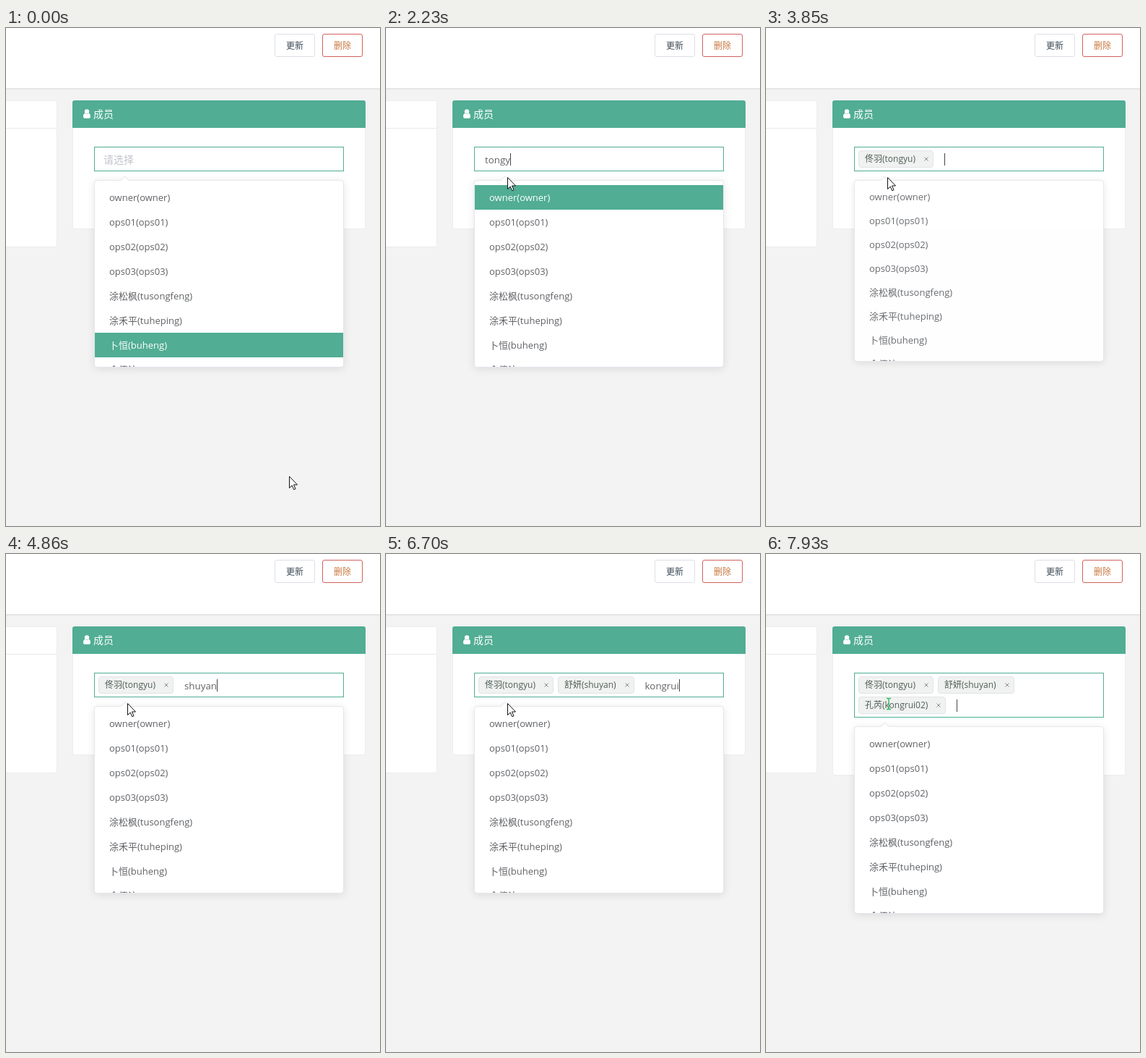
An HTML page that plays this animation: 518 px wide and 688 px high, repeating every 8 s.

```html
<!DOCTYPE html>
<html lang="zh-CN">
<head>
<meta charset="utf-8">
<style>
  html, body { margin: 0; width: 100%; height: 100%; overflow: hidden; }
  body { position: relative; background: #f3f3f3; color: #606266;
         font: 13px "Open Sans", "Noto Sans CJK SC", "Noto Sans CJK", sans-serif; }
  body > * { position: absolute; box-sizing: border-box; }
  .bar { left: 0; top: 0; width: 518px; height: 85px; background: #fff; border-bottom: 2px solid #e5e5e5; }
  .button { top: 8px; width: 56px; height: 32px; border: 1px solid #dcdfe6; border-radius: 3px;
            font-size: 12px; line-height: 31px; text-align: center; color: #3c4a56; }
  .danger { border-color: #d2615c; color: #c8783f; }
  .panel { top: 100px; background: #fff; border-radius: 3px; box-shadow: inset 0 0 0 1px #ebedf1; }
  .side { left: -20px; width: 91px; height: 203px; }
  .side::before { content: ""; position: absolute; top: 38px; width: 100%; height: 1px; background: #e6e8ec; }
  .main { left: 92px; width: 406px; padding: 0 30px 80px; }
  .title { margin: 0 -30px 26px; height: 38px; padding-left: 29px; background: #51ad94; color: #fff;
           border-radius: 3px 3px 0 0; font-size: 14px; line-height: 38px; }
  .title svg { position: absolute; left: 15px; top: 12px; }

  .field { position: relative; border: 1px solid #51ad94; }
  .values { display: flex; flex-wrap: wrap; padding: 4px 0 0 5px; }
  .tag { position: relative; box-sizing: border-box; height: 24px; margin: 0 6px 4px 0; padding: 0 24px 0 8px;
         border: 1px solid #e3e4e6; border-radius: 4px; background: #f0f1f1;
         font-size: 12px; line-height: 22px; color: #4f5f55; white-space: nowrap; }
  .tag svg { position: absolute; right: 6px; top: 8px; }
  .query { position: relative; height: 24px; margin: 0 0 4px 9px; font-size: 13.333px; line-height: 26px; white-space: pre; }
  .caret { position: absolute; left: 100%; top: 4px; width: 1px; height: 17px; background: #444; }
  .hint { position: absolute; left: 12px; top: 0; font-size: 14px; line-height: 34px; color: #c0c4cc; }

  .menu { position: absolute; top: calc(100% + 13px); left: -1px; right: -1px; border: 1px solid #e4e7ed;
          border-radius: 4px; background: #fff; box-shadow: 0 2px 12px rgba(0,0,0,.1); transform-origin: top; }
  .menu::before { content: ""; position: absolute; left: 37px; top: -5px; width: 8px; height: 8px; background: #fff;
          border: solid #e4e7ed; border-width: 1px 0 0 1px; transform: rotate(45deg); }
  .list { position: relative; box-sizing: border-box; max-height: 257px; padding: 6px 0; overflow: hidden; }
  .item { height: 34px; padding-left: 20px; line-height: 34px; white-space: nowrap; }
  .hot { background: #51ad94; color: #fff; }
  #mouse { left: 0; top: 0; overflow: visible; }
</style>
</head>
<body>
<div class="bar"></div>
<div class="button" style="left:372px">更新</div>
<div class="button danger" style="left:438px">删除</div>
<div class="panel side"></div>
<div class="panel main">
  <div class="title">
    <svg width="10" height="13" fill="#fff"><circle cx="5" cy="3.4" r="3.2"/><path d="M0 10.5C0 7 1.3 6 2.5 6Q5 8.2 7.5 6C8.7 6 10 7 10 10.5Q10 12.8 8 12.8H2Q0 12.8 0 10.5Z"/></svg>成员
  </div>
  <div class="field">
    <div class="values" id="values"></div>
    <div class="menu" id="menu"><div class="list" id="list"></div></div>
  </div>
</div>
<svg id="mouse" width="13" height="20">
  <path id="arrow" d="M.5 .5V16.5L4.2 13 6.7 18.7 9 17.7 6.5 12H11.5Z" fill="#fff" stroke="#111"/>
  <path id="beam" d="M-3 -7.5H-1L0 -6.5 1 -7.5H3M0 -6.5V6.5M-3 7.5H-1L0 6.5 1 7.5H3" fill="none" stroke="#2dba58" stroke-width="1.4"/>
</svg>
<script>
const LOOP = 8000;
const people = ["owner(owner)", "ops01(ops01)", "ops02(ops02)", "ops03(ops03)",
  "涂松枫(tusongfeng)", "涂禾平(tuheping)", "卜恒(buheng)", "金倩汶(jinqianwen)"];
const chosen = ["佟羽(tongyu)", "舒妍(shuyan)", "孔芮(kongrui02)"];
const pick = { tags: 0, text: "", items: people, hot: -1, caret: true, squash: true };

// Each step keeps the earlier state and changes only what it names.
const steps = [
  [0, { tags: 0, text: "", items: people, hot: 6, caret: false, squash: false, beam: false, mouse: [392, 619] }],
  [200, { mouse: [348, 520] }],
  [400, { mouse: [275, 395], hot: 5 }],
  [610, { mouse: [205, 290], hot: 2, caret: true }],
  [810, { mouse: [176, 226], hot: 0 }],
  [1010, { mouse: [167, 151] }],
  [1210, { mouse: [168, 206], caret: false }],
  [1820, { text: "t", caret: true }],
  [2020, { text: "ton" }],
  [2230, { text: "tongy" }],
  [2430, { text: "tongyu" }],
  [2630, { items: [chosen[0]], hot: -1 }],
  [2830, { caret: false }],
  [3440, { hot: 0, caret: true }],
  [3850, { ...pick, tags: 1 }],
  [4040, { squash: false }],
  [4260, { text: "sh" }],
  [4460, { text: "shuy" }],
  [4660, { text: "shuya" }],
  [4860, { text: "shuyan" }],
  [5270, { items: [chosen[1]], caret: false }],
  [5480, { hot: 0 }],
  [5880, { ...pick, tags: 2 }],
  [6090, { squash: false, text: "k" }],
  [6290, { text: "kong" }],
  [6500, { text: "kongr" }],
  [6700, { text: "kongrui" }],
  [7110, { items: ["孔芮(kongrui)", chosen[2]], caret: false }],
  [7310, { hot: 0 }],
  [7520, { hot: 1 }],
  [7720, { ...pick, tags: 3, beam: true, mouse: [170, 207] }],
  [7930, { squash: false }]
];

const el = id => document.getElementById(id);
const cross = '<svg width="6" height="6"><path d="M.5 .5L5.5 5.5M5.5 .5L.5 5.5" stroke="#85898c"/></svg>';

function draw(s) {
  const tags = chosen.slice(0, s.tags).map(name => `<div class="tag">${name}${cross}</div>`).join("");
  const hint = s.tags || s.text ? "" : '<div class="hint">请选择</div>';
  const caret = s.caret ? '<i class="caret"></i>' : "";
  el("values").innerHTML = `${tags}${hint}<div class="query">${s.text}${caret}</div>`;
  el("list").innerHTML = s.items.map((name, i) =>
    `<div class="item${i === s.hot ? " hot" : ""}">${name}</div>`).join("");
  el("menu").style.transform = s.squash ? "scaleY(.969)" : "none";
  el("menu").style.opacity = s.squash ? .92 : 1;
  el("mouse").style.transform = `translate(${s.mouse[0]}px, ${s.mouse[1]}px)`;
  el("arrow").style.display = s.beam ? "none" : "";
  el("beam").style.display = s.beam ? "" : "none";
}

let shown = 0;
function tick(now) {
  const past = steps.filter(([start]) => start <= now % LOOP);
  if (past.length !== shown) {
    shown = past.length;
    draw(Object.assign({}, ...past.map(([, change]) => change)));
  }
  requestAnimationFrame(tick);
}
tick(performance.now());
</script>
</body>
</html>
```
